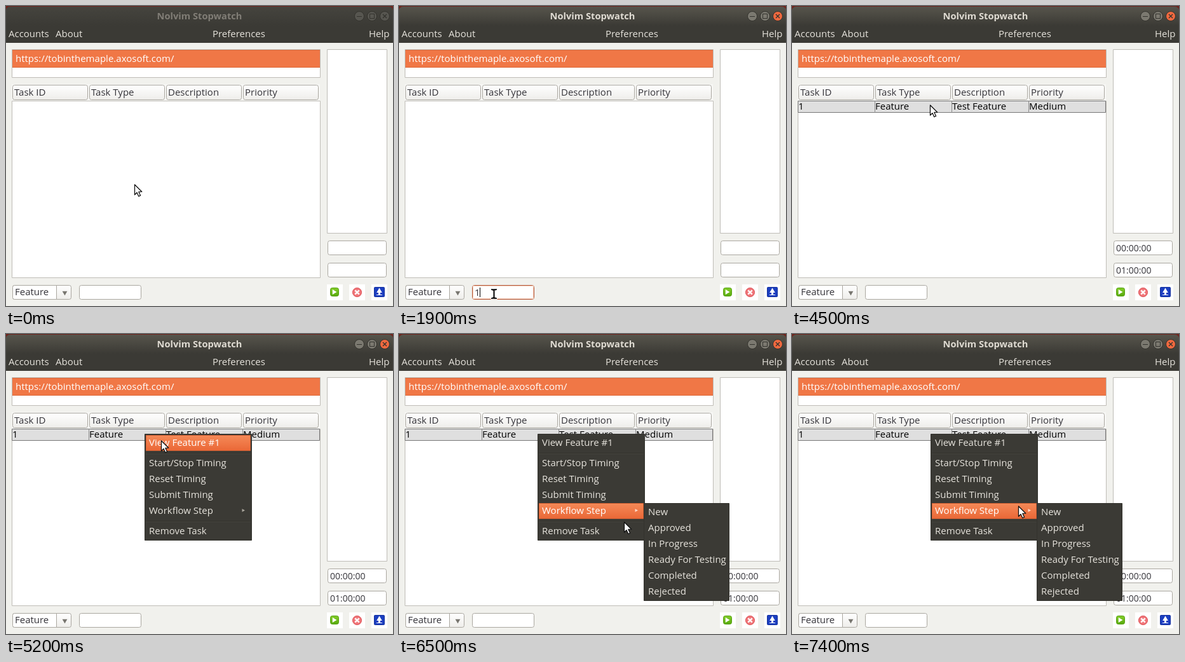
Animation of 609x472 px, one loop 8000 ms. Source, as an HTML page with a canvas:

```html
<!DOCTYPE html>
<html lang="en">
<head>
<meta charset="utf-8">
<title>Stopwatch</title>
<style>
html, body { margin: 0; width: 100%; height: 100%; overflow: hidden; background: #f1f1ed; }
canvas { display: block; }
</style>
</head>
<body>
<canvas id="stage" width="609" height="472"></canvas>
<script>
const ctx = document.getElementById('stage').getContext('2d');
const LOOP = 8000, TICK = 100, SUBMENU_DELAY = 200;
const FOCUS = 1000, TYPE = 1900, ADD = 3100, CARET_OFF = 4200, BLUR = 4500, MENU = 4900;
const FONT = '"Open Sans", "Noto Sans", sans-serif';
const DARK = '#3b3a35', LIGHT = '#e6e3dc', INK = '#35343a', EDGE = '#aaa7a0';
const ROW = 25, GAP = 7, WORKFLOW = 4;

// Each glide ends at a resting point of the pointer
const home = { x: 202, y: 281 };
const glides = [
  { from: 200, to: 1100, x: 204, y: 453 },
  { from: 1100, to: 1200, x: 149, y: 453 },
  { from: 3500, to: 4300, x: 217, y: 156 },
  { from: 5100, to: 5700, x: 306, y: 194 },
  { from: 5800, to: 6200, x: 350, y: 272 },
  { from: 6400, to: 6600, x: 355, y: 304 },
  { from: 7000, to: 7400, x: 356, y: 271 }
];

const columns = ['Task ID', 'Task Type', 'Description', 'Priority'];
const task = ['1', 'Feature', 'Test Feature', 'Medium'];
const items = ['View Feature #1', 'Start/Stop Timing', 'Reset Timing',
  'Submit Timing', 'Workflow Step', 'Remove Task'];
const steps = ['New', 'Approved', 'In Progress', 'Ready For Testing', 'Completed', 'Rejected'];

const easeOut = k => 1 - (1 - k) ** 2;
const columnX = i => 10 + 121 * i;
// Separators follow the first item and the workflow item
const itemTop = i => 159 + ROW * i + GAP * ((i > 0) + (i > WORKFLOW));

function pointer(t) {
  let { x, y } = home;
  for (const g of glides) {
    const k = easeOut(Math.min(1, Math.max(0, (t - g.from) / (g.to - g.from))));
    x += (g.x - x) * k;
    y += (g.y - y) * k;
  }
  return { x: Math.round(x), y: Math.round(y) };
}

function hovered(t) {
  const { y } = pointer(t);
  return items.findLastIndex((_, i) => itemTop(i) <= y);
}

function rect(x, y, w, h, fill) {
  ctx.fillStyle = fill;
  ctx.fillRect(x, y, w, h);
}

function box(x, y, w, h, fill, border, r = 0) {
  ctx.beginPath();
  ctx.roundRect(x + 0.5, y + 0.5, w - 1, h - 1, r);
  ctx.fillStyle = fill;
  ctx.fill();
  ctx.lineWidth = 1;
  ctx.strokeStyle = border;
  ctx.stroke();
}

function text(s, x, y, color, size = 15, weight = 400, align = 'left') {
  ctx.font = `${weight} ${size}px ${FONT}`;
  ctx.textAlign = align;
  ctx.fillStyle = color;
  ctx.fillText(s, x, y);
}

function shade(y, h, top, bottom) {
  const g = ctx.createLinearGradient(0, y, 0, y + h);
  g.addColorStop(0, top);
  g.addColorStop(1, bottom);
  return g;
}

function poly(points, fill) {
  ctx.beginPath();
  points.forEach(([x, y]) => ctx.lineTo(x, y));
  ctx.closePath();
  ctx.fillStyle = fill;
  ctx.fill();
}

function triangle(x, y, r, angle, fill) {
  const turn = a => [x + r * Math.cos(angle + a), y + r * Math.sin(angle + a)];
  poly([0, 2, 4].map(n => turn(n * Math.PI / 3)), fill);
}

function disc(x, y, r, fill, border) {
  ctx.beginPath();
  ctx.arc(x, y, r, 0, Math.PI * 2);
  ctx.fillStyle = fill;
  ctx.fill();
  ctx.strokeStyle = border;
  ctx.lineWidth = 1;
  ctx.stroke();
}

function cross(x, y, r, color, width) {
  ctx.beginPath();
  for (const s of [-1, 1]) {
    ctx.moveTo(x - r, y - r * s);
    ctx.lineTo(x + r, y + r * s);
  }
  ctx.strokeStyle = color;
  ctx.lineWidth = width;
  ctx.stroke();
}

const button = (x, y, w, h) => box(x, y, w, h, shade(y, h, '#fff', '#eeedea'), EDGE, 3);
const field = (x, y, w, border = EDGE) => box(x, y, w, 23, '#fff', border, 3);

function titleBar(active) {
  rect(0, 0, 609, 32, '#6e231c');
  ctx.beginPath();
  ctx.roundRect(0, 1, 609, 40, [6, 6, 0, 0]);
  ctx.fillStyle = shade(1, 30, active ? '#57554c' : '#45443e', DARK);
  ctx.fill();
  rect(0, 31, 609, 27, DARK);
  text('Nolvim Stopwatch', 304.5, 21, active ? '#dfdbd2' : '#807d76', 14.67, 700, 'center');

  const grey = active ? '#7b7970' : '#575650', mark = '#34332e';
  [grey, grey, active ? '#f0693f' : grey].forEach((fill, i) => disc(556 + 20 * i, 16, 7.5, fill, mark));
  rect(552, 16, 8, 1, mark);
  ctx.strokeRect(572.5, 12.5, 7, 7);
  cross(596, 16, 3, mark, 1.4);

  text('Accounts', 4, 49, LIGHT);
  text('About', 78, 49, LIGHT);
  text('Preferences', 325, 49, LIGHT);
  text('Help', 571, 49, LIGHT);
}

function icons() {
  for (let i = 0; i < 3; i++) rect(505 + 35 * i, 438, 25, 25, '#fff');
  box(510, 443, 14, 14, shade(443, 14, '#86cf2c', '#56a80c'), '#55a011', 3);
  triangle(516, 450, 4.5, 0, '#fff');
  disc(552.5, 450.5, 7, '#f0767a', '#dc4a4f');
  cross(552.5, 450.5, 3.2, '#fff', 2.4);
  box(579, 442, 17, 16, '#1c3fc0', '#14309c', 1);
  triangle(587.5, 448.5, 5, -Math.PI / 2, '#fff');
  rect(586, 449, 3, 5, '#fff');
  rect(583, 454, 9, 1, '#fff');
}

function panels(hasTask) {
  const edge = '#bfbdb7';
  box(9, 68, 486, 45, '#fff', edge);
  rect(10, 69, 484, 28, '#dd6a3b');
  rect(10, 70, 484, 26, '#f07746');
  text('https://tobinthemaple.axosoft.com/', 15, 88, '#fff');
  box(505, 68, 95, 290, '#fff', edge);
  box(9, 149, 486, 279, '#fff', edge);

  rect(9, 123, 485, 26, '#f7f7f5');
  columns.forEach((s, i) => {
    button(columnX(i), 124, 119, 24);
    text(s, columnX(i) + 3, 141, INK);
  });
  if (hasTask) {
    box(9, 149, 485, 19, '#dfdfdf', '#777');
    task.forEach((s, i) => {
      if (i) rect(columnX(i) - 1, 149, 1, 19, '#8c8c8c');
      text(s, columnX(i), 163, '#000');
    });
  }

  ['00:00:00', '01:00:00'].forEach((s, i) => {
    const y = 369 + 35 * i;
    field(506, y, 93);
    if (hasTask) text(s, 510, y + 17, INK, 14);
  });
}

function form(t) {
  button(10, 439, 93, 23);
  box(10, 439, 70, 23, '#fff', EDGE, [3, 0, 0, 3]);
  text('Feature', 14, 455, INK);
  triangle(92.5, 451, 4.5, Math.PI / 2, '#77756f');

  const focused = t >= FOCUS && t < BLUR;
  const typed = t >= TYPE && t < ADD;
  field(115, 439, 98, focused ? '#b4593a' : EDGE);
  if (focused) {
    ctx.strokeStyle = '#f3c9b4';
    ctx.strokeRect(116.5, 440.5, 95, 20);
  }
  if (typed) text('1', 119, 456, INK);
  if (focused && t < CARET_OFF) rect(typed ? 127 : 119, 443, 1, 15, '#000');
}

function menu(t) {
  const popup = (x, y, w, h) => box(x, y, w, h, DARK, '#33322d');
  const hover = hovered(t);
  popup(218, 157, 169, 168);
  items.forEach((s, i) => {
    const y = itemTop(i), on = hover === i;
    if (i === 0 || i === WORKFLOW) {
      rect(220, y + ROW + 3, 165, 1, '#32312c');
      rect(220, y + ROW + 4, 165, 1, '#45443e');
    }
    if (on) box(220, y, 165, ROW, shade(y, ROW, '#f58a58', '#ea6736'), '#cf5f33');
    text(s, 225, y + 17, on ? '#fff' : LIGHT);
    if (i === WORKFLOW) triangle(373, y + 11.5, 3, 0, on ? '#ffd9c8' : '#aaa69d');
  });
  if (hover === WORKFLOW && hovered(t - SUBMENU_DELAY) === WORKFLOW) {
    popup(385, 266, 135, 154);
    steps.forEach((s, i) => text(s, 392, 285 + ROW * i, LIGHT));
  }
}

function beam() {
  ctx.beginPath();
  for (const s of [-1, 1]) {
    ctx.moveTo(-3, 7 * s);
    ctx.lineTo(0, 6 * s);
    ctx.lineTo(4, 7 * s);
  }
  ctx.moveTo(0.5, -7);
  ctx.lineTo(0.5, 7);
  ctx.lineCap = 'round';
  for (const [color, width] of [['#fff', 4], ['#000', 2]]) {
    ctx.strokeStyle = color;
    ctx.lineWidth = width;
    ctx.stroke();
  }
}

function arrow() {
  poly([[0.5, 0], [0.5, 16], [4, 12.5], [6.8, 18.5], [9.6, 17.2], [6.9, 11.4], [11.8, 11.2]], '#fff');
  ctx.strokeStyle = '#111';
  ctx.lineWidth = 1.3;
  ctx.lineJoin = 'round';
  ctx.stroke();
}

function cursor({ x, y }) {
  const inField = x > 114 && x < 214 && y > 438 && y < 463;
  ctx.save();
  ctx.translate(x, y);
  (inField ? beam : arrow)();
  ctx.restore();
}

function draw(now) {
  // The screen refreshes ten times a second
  const t = Math.floor((now % LOOP) / TICK) * TICK;
  rect(0, 0, 609, 472, '#f1f1ed');
  titleBar(t >= FOCUS);
  panels(t >= ADD);
  form(t);
  icons();
  if (t >= MENU) menu(t);
  cursor(pointer(t));
}

const start = performance.now();
function tick() {
  draw(performance.now() - start);
  requestAnimationFrame(tick);
}
tick();
</script>
</body>
</html>
```
